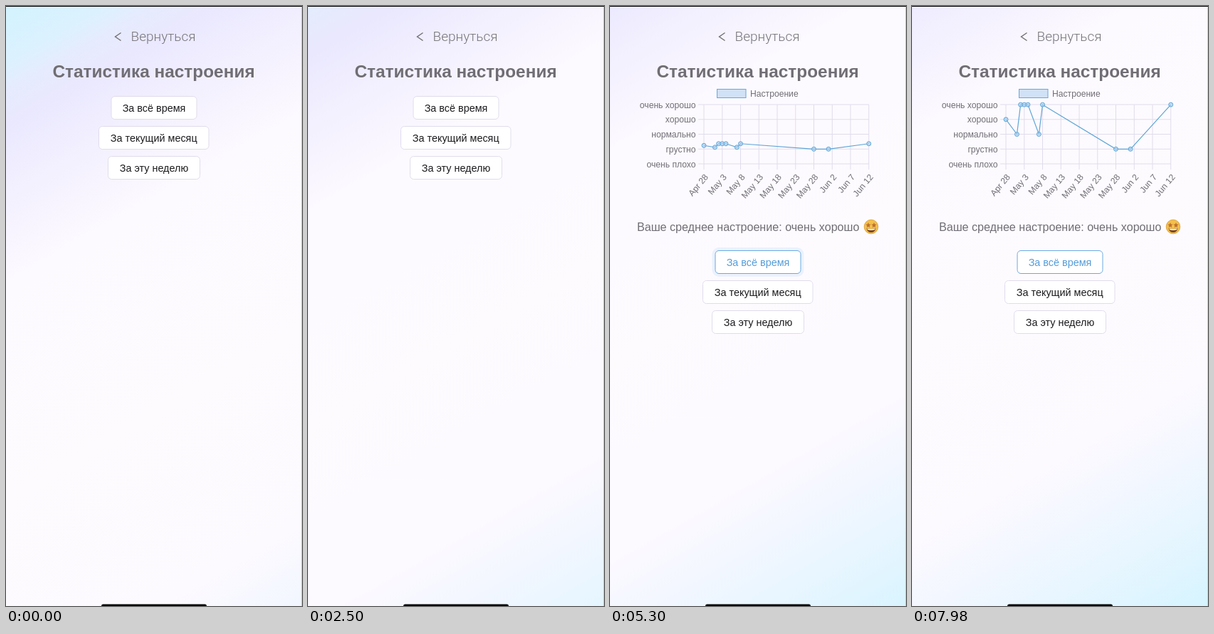
Recreate the animation shown at these times as an HTML page. Size 416x840 px, loop 8000 ms.

```html
<!DOCTYPE html>
<html lang="ru">
<head>
<meta charset="utf-8">
<title>Статистика настроения</title>
<style>
  :root { --loop: 8s; --gray: #706e74; --blue: #5fa6d6; --line: #e0dcec; }
  html, body { margin: 0; width: 100%; height: 100%; overflow: hidden; background: #fdfbff; }
  .stage { position: relative; width: 416px; height: 840px; overflow: hidden; }
  .sky {
    position: absolute; inset: 0 0 auto; height: 1050px;
    background: linear-gradient(150.3deg,
      #d2f3ff 0, #dcf1fe 70px, #e6ebfd 105px, #eae8fe 145px, #f4f1ff 240px, #fdfaff 347px,
      #fefbff 600px, #fdfaff 830px, #f3f7ff 920px, #e8f6ff 1000px, #dff5ff 1060px, #d6f4ff 1115px);
    animation: drift var(--loop) cubic-bezier(.39, .575, .565, 1) infinite;
  }
  svg { position: absolute; inset: 0; font-family: "Liberation Sans", Arial, sans-serif; fill: var(--gray); }
  .back { font: 300 19px Roboto, sans-serif; fill: #77757b; }
  .title { font-size: 24.4px; font-weight: 700; text-anchor: middle; }
  .button text { font-size: 14.4px; text-anchor: middle; fill: #1c1c1f; }
  .button rect { fill: #fff; stroke: var(--line); }
  .buttons { animation: drop var(--loop) step-end infinite; }
  .button.first text { animation: tint-text var(--loop) linear infinite; }
  .button.first rect:last-of-type { animation: tint-border var(--loop) linear infinite; }
  .button .glow { fill: none; stroke: #a9d3f7; stroke-width: 5; opacity: 0; animation: glow var(--loop) linear infinite; }
  .chart { font-size: 12.15px; animation: reveal var(--loop) step-end infinite; }
  .end { text-anchor: end; }
  .grid { stroke: var(--line); fill: none; }
  .curve { stroke: var(--blue); stroke-width: 1.2; fill: none; }
  .dot { stroke: var(--blue); fill: #a9cff0; fill-opacity: .7; }
  .average { font-size: 16.1px; }

  @keyframes drift { to { transform: translateY(-210px); } }
  @keyframes drop { 0% { transform: none; } 64.9%, 100% { transform: translateY(216px); } }
  @keyframes reveal { 0% { visibility: hidden; } 64.9%, 100% { visibility: visible; } }
  @keyframes tint-text { 0%, 45% { fill: #1c1c1f; } 52%, 100% { fill: #559cd8; } }
  @keyframes tint-border { 0%, 45% { stroke: var(--line); } 52%, 100% { stroke: #6aaae0; } }
  @keyframes glow { 0%, 46% { opacity: 0; } 52% { opacity: .55; } 76%, 100% { opacity: 0; } }
</style>
</head>
<body>
<div class="stage">
  <div class="sky"></div>
  <svg width="416" height="840" viewBox="0 0 416 840">
    <path d="M161.5 37.5 153.5 43l8 5.5" fill="none" stroke="#706e74" stroke-width="1.4"/>
    <text class="back" x="175.5" y="49">Вернуться</text>
    <text class="title" x="207.5" y="100">Статистика настроения</text>

    <g class="chart">
      <rect x="150.5" y="116.5" width="40.5" height="12" fill="#cfe2f7" stroke="#68a9d8"/>
      <text x="197" y="126.5">Настроение</text>
      <path class="grid"/>
      <g class="labels"></g>
      <polyline class="curve"/>
      <g class="dots"></g>
      <text class="average" x="38" y="315">Ваше среднее настроение: очень хорошо</text>
      <g transform="translate(367 309)">
        <circle r="9.8" fill="#f3c04a" stroke="#d79a35" stroke-width=".8"/>
        <path d="M-6.5 2Q0 3.8 6.5 2 5.5 8 0 8T-6.5 2Z" fill="#7b4524"/>
        <path d="M-5.8 2.5Q0 4 5.8 2.5L5 4.3Q0 5.5-5 4.3Z" fill="#fffbe8"/>
        <g class="eyes" fill="#bd7030"></g>
      </g>
    </g>

    <g class="buttons"></g>

    <rect width="416" height="1" fill="#050505"/>
    <rect x="415" y="1" width="1" height="839" fill="#cfccd6"/>
    <rect x="134" y="837.5" width="148" height="6" rx="2.5" fill="#050505"/>
  </svg>
</div>
<script>
const LOOP = 8000;
const find = selector => document.querySelector(selector);

function add(parent, tag, attrs, text = '') {
  const node = document.createElementNS('http://www.w3.org/2000/svg', tag);
  for (const key in attrs) node.setAttribute(key, attrs[key]);
  node.textContent = text;
  return parent.appendChild(node);
}

// Buttons
[['За всё время', 148, 120, 126.5], ['За текущий месяц', 130.5, 154.5, 168.5], ['За эту неделю', 143.5, 129, 210.5]]
  .forEach(([label, x, width, y], i) => {
    const group = add(find('.buttons'), 'g', { class: i ? 'button' : 'button first' });
    const box = { x, y, width, height: 32, rx: 5 };
    if (!i) add(group, 'rect', { ...box, class: 'glow', x: x - 2, y: y - 2, width: width + 4, height: 36, rx: 7 });
    add(group, 'rect', box);
    add(group, 'text', { x: x + width / 2, y: y + 21 }, label);
  });

// Chart axes
const LEFT = 132, BOTTOM = 221, ROW = 20.75, DAY = 5.15;
const moods = ['очень плохо', 'грустно', 'нормально', 'хорошо', 'очень хорошо'];
const dates = ['Apr 28', 'May 3', 'May 8', 'May 13', 'May 18', 'May 23', 'May 28', 'Jun 2', 'Jun 7', 'Jun 12'];
const levelY = level => BOTTOM - level * ROW;
let grid = '';
moods.forEach((mood, level) => {
  grid += `M124 ${levelY(level)}H364`;
  add(find('.labels'), 'text', { class: 'end', x: 120.5, y: levelY(level) + 4.5 }, mood);
});
dates.forEach((date, i) => {
  const x = LEFT + i * 5 * DAY;
  grid += `M${x} ${levelY(4)}V229`;
  add(find('.labels'), 'text', { class: 'end', y: 4.2, transform: `translate(${x + 3.5} 237) rotate(-50)` }, date);
});
find('.grid').setAttribute('d', grid);

// Star eyes
for (const side of [-4, 4]) {
  const points = Array.from({ length: 10 }, (_, i) => {
    const angle = i * Math.PI / 5, radius = i % 2 ? 1.7 : 3.9;
    return [side + radius * Math.sin(angle), -2 - radius * Math.cos(angle)];
  });
  add(find('.eyes'), 'polygon', { points: points.join(' ') });
}

// Chart values as [day, mood level]
const entries = [[0, 3], [3, 2], [4, 4], [5, 4], [6, 4], [9, 2], [10, 4], [30, 1], [34, 1], [45, 4]];
const dots = entries.map(([day]) => add(find('.dots'), 'circle', { class: 'dot', cx: LEFT + day * DAY, r: 3 }));
const clamp = value => Math.min(1, Math.max(0, value));

function draw() {
  const time = performance.now() % LOOP;
  const rise = 1 - (1 - clamp((time - 5190) / 3500)) ** 4;
  const base = levelY(1 - clamp((time - 5300) / 400));
  const points = entries.map(([day, level], i) => {
    const y = base + (levelY(level) - base) * rise;
    dots[i].setAttribute('cy', y);
    return [LEFT + day * DAY, y];
  });
  find('.curve').setAttribute('points', points.join(' '));
  requestAnimationFrame(draw);
}
draw();
</script>
</body>
</html>
```
